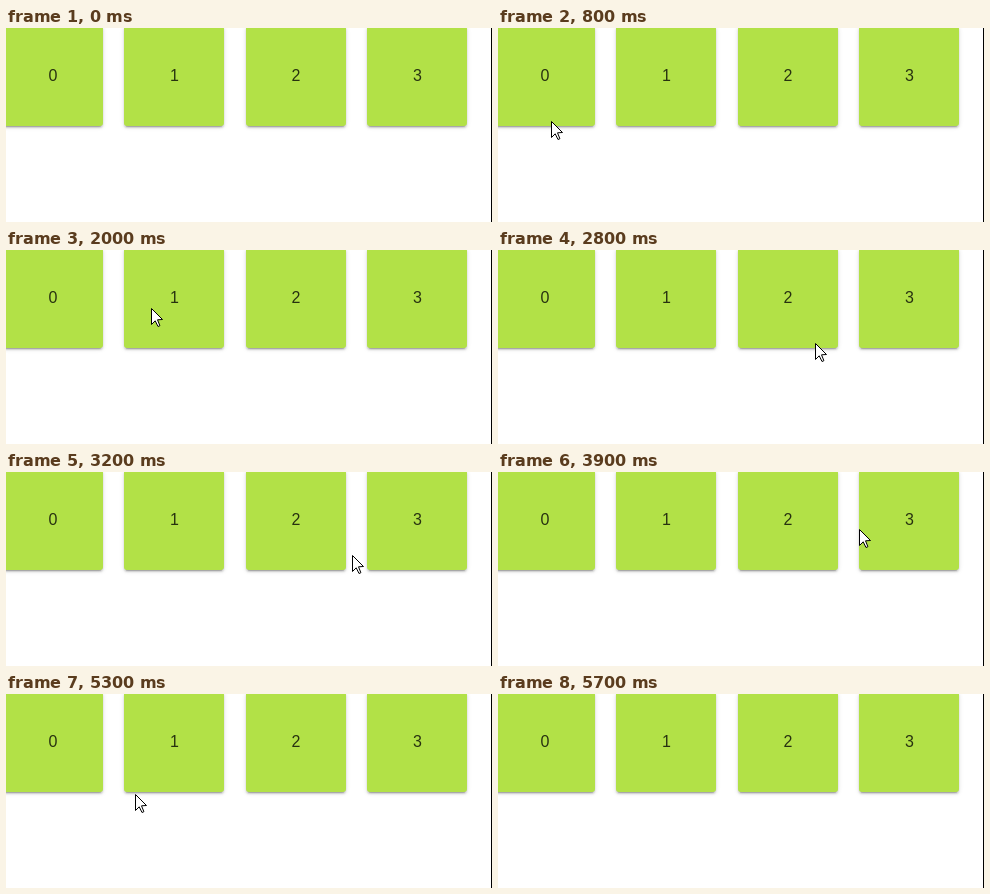
Animation, 486 px wide and 194 px high, one loop 6600 ms. Source, as an HTML page:

```html
<!DOCTYPE html>
<html lang="en">
<head>
<meta charset="utf-8">
<title>Cards</title>
<style>
html, body { margin: 0; width: 100%; height: 100%; overflow: hidden; background: #fff; }
#stage { position: relative; width: 486px; height: 194px; overflow: hidden; border-right: 1px solid #000; box-sizing: border-box; }
.card {
  position: absolute; top: -2px; width: 100px; height: 100px;
  display: flex; align-items: center; justify-content: center;
  background: #b2e147; border-radius: 3px;
  box-shadow: 0 3px 1px -2px rgba(0,0,0,.2), 0 2px 2px rgba(0,0,0,.14), 0 1px 5px rgba(0,0,0,.12);
  font: 16px/24px "Liberation Sans", Arial, sans-serif; color: rgba(0,0,0,.78);
}
.on { background: #90c1ae; }
.on.wide { box-shadow: 5px 0 #90c1ae; }
#cursor { position: absolute; left: 0; top: 0; z-index: 1; }
</style>
</head>
<body>
<div id="stage">
  <svg id="cursor" width="13" height="20"><path d="M.5 .5V16.5L4.2 12.8L7 18.5L8.9 17.7L6.5 11.8L11.5 11.5Z" fill="#fff" stroke="#000"/></svg>
</div>
<script>
const LOOP = 6600, STEP = 100, PITCH = 121.45;
const stage = document.getElementById("stage");
const cursor = document.getElementById("cursor");

const labels = [0, 1, 2, 3].map(i => {
  const card = document.createElement("div");
  card.className = "card";
  card.style.left = -3 + PITCH * i + "px";
  const label = document.createElement("span");
  label.textContent = i;
  card.append(label);
  stage.append(card);
  return label;
});
labels[1].className = "wide";

// Resting places of the pointer: arrival time, travel time, place, downward bend of the way there
const stops = [
  { at: 0, x: 64, y: 205 },
  { at: 100, x: 292, y: 23 },
  { at: 200, x: 329, y: -25 },
  { at: 600, x: 53, y: 205 },
  { at: 1000, takes: 400, x: 53, y: -20 },
  { at: 1400, x: 50, y: 24 },
  { at: 2000, takes: 600, x: 145, y: 58, bend: 35 },
  { at: 2200, takes: 200, x: 164, y: 32 },
  { at: 2800, takes: 400, x: 317, y: 93, bend: 42 },
  { at: 3100, takes: 300, x: 327, y: 78 },
  { at: 3500, takes: 400, x: 404, y: 54, bend: 14 },
  { at: 4400, takes: 600, x: 145, y: 74 },
  { at: 5700, takes: 500, x: 64, y: 205 }
];

function pointer(t) {
  const next = stops.findIndex(s => s.at >= t);
  if (next < 1) return stops.at(next);
  const from = stops[next - 1];
  const { at, takes = STEP, x, y, bend = 0 } = stops[next];
  const u = Math.max(0, 1 - (at - t) / takes);
  return {
    x: Math.round(from.x + (x - from.x) * u),
    y: Math.round(from.y + (y - from.y) * u + bend * 4 * u * (1 - u))
  };
}

let origin;
function frame(now) {
  origin ??= now;
  const t = Math.floor((now - origin) % LOOP / STEP) * STEP;
  const { x, y } = pointer(t);
  cursor.style.transform = `translate(${x}px, ${y}px)`;
  const dragging = t >= 3900 && t < 4800;
  labels[1].classList.toggle("on", dragging && x < 168);
  labels[2].classList.toggle("on", dragging && x < 290);
  requestAnimationFrame(frame);
}
requestAnimationFrame(frame);
</script>
</body>
</html>
```
